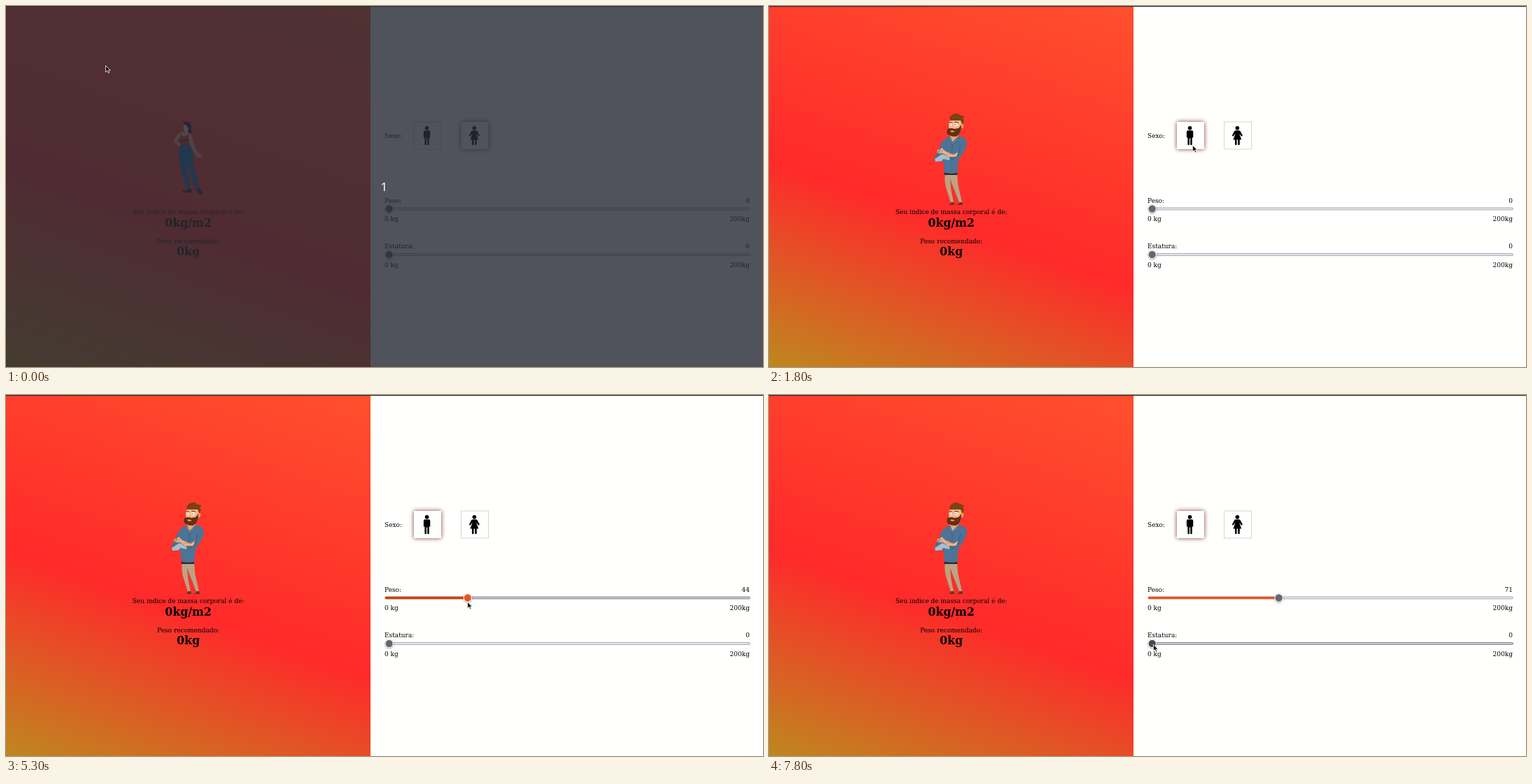
An HTML page for the animation above (8000 ms loop, 1082 by 517 pixels).

```html
<!DOCTYPE html>
<html lang="pt">
<head>
<meta charset="utf-8">
<title>Índice de massa corporal</title>
<style>
html, body { margin: 0; width: 100%; height: 100%; overflow: hidden; background: #fffffe; }
svg { position: absolute; left: 0; top: 0; width: 1082px; height: 517px; }
.panel { position: absolute; left: 0; top: 0; width: 521px; height: 517px;
  background: linear-gradient(199.5deg, #ff502d 0%, #ff2a2a 58%, #be871f 100%); }
text { font: 9px "DejaVu Serif", "Noto Serif", serif; fill: #000; }
.big { font-size: 15.75px; font-weight: bold; }
.mid { text-anchor: middle; }
.end { text-anchor: end; }
.count { font: 17px "Noto Sans", sans-serif; fill: #fff; }
</style>
</head>
<body>
<div class="panel"></div>
<svg viewBox="0 0 1082 517">
  <defs>
    <filter id="glow" x="-50%" y="-50%" width="200%" height="200%"><feGaussianBlur stdDeviation="3"/></filter>
    <filter id="soft" x="-50%" y="-50%" width="200%" height="200%"><feGaussianBlur stdDeviation=".8"/></filter>
  </defs>
  <rect width="1082" height="1.2" fill="#2d2e32"/>

  <g id="woman">
    <path d="M250 181Q244 184 240 193Q240 196 248 201L250 198L244 193L251 187Z" fill="#eeb08d"/>
    <path d="M261 181Q265 183 267 192L272 207L280 215L280 218L277 217L274 218L268 209L261 192Z" fill="#eeb08d"/>
    <path d="M249 182L257 178L264 183L262 191H249Z" fill="#f1b795"/>
    <path d="M253 168Q256 164 262 167Q267 172 264 177Q268 180 263 183Q258 180 258 174Z" fill="#17123b"/>
    <path d="M254 169L259 169L261 175L259 182L256 181V178L254 177Z" fill="#ffd9c2"/>
    <path d="M253 169Q256 165 261 168L260 175L258 171Z" fill="#17123b"/>
    <path d="M253 166Q254 164 256 165M264 174l2 1" fill="none" stroke="#7b1522"/>
    <path d="M250 182L251 186Q255 188 259 185L261 182L262 192L260 200H250L248 191Z" fill="#d83018"/>
    <path d="M249 192L260 191.5V193L250 194Z" fill="#391622"/>
    <path d="M250 199H261Q266 204 267 213L269 233L277 262L272 264L263 241L258 218L260 239L264 262H259Q249 235 247 216Q247 206 250 199Z" fill="#0871bd"/>
    <path d="M250 204Q257 211 263 204M257 211L260 220L262 235M250 222L257 246" fill="none" stroke="#075392" stroke-width=".8"/>
    <path d="M259 261L265 262L266 267H253Q251 265 254 264L258 265ZM272 263L277 261L280 266V270L276 269Z" fill="#1c1931"/>
  </g>

  <g id="man">
    <path d="M252 240H269L270 255L276 282H272L262 256L259 248L260 262L264 282H260L253 260Q250 248 252 240Z" fill="#bfa283"/>
    <path d="M259 249L262 257L272 282" fill="none" stroke="#8e7358" stroke-width=".8"/>
    <path d="M260 281H264L265 285H257Q258 283 260 283ZM272 281H276L277 285H269Q270 283 272 283Z" fill="#653424"/>
    <path d="M256 188L264 185L275 187Q282 189 283 196Q281 209 271 219L269 241H251L249 222L239 223Q235 222 237 217L246 197Q249 190 256 188Z" fill="#4d7397"/>
    <path d="M250 238.5Q260 241 269 239V242H251Z" fill="#33272b"/>
    <path d="M258 185L269 181L271 187L261 196Z" fill="#e9a474"/>
    <path d="M259 187L262 196L270 187L271 191L262 199L256 190ZM262 198L261 220" fill="#5c82a5" stroke="#34587c" stroke-width=".7"/>
    <path d="M257 166L266 160L277 162L276 172L272 182L257 180Z" fill="#f7b889"/>
    <path d="M275 169Q280 168 277 175L274 175Z" fill="#eda477"/>
    <path d="M258 162Q259 155 267 154Q270 153 272 156L279 158L277 162L279 164L276 170L274 164L260 164Z" fill="#7d4210"/>
    <path d="M255 176Q261 174 265 176L271 175L275 170Q275 184 267 187Q256 187 254 181Z" fill="#662e12"/>
    <path d="M259 179Q262 177 266 180L261 181Z" fill="#e99a79"/>
    <circle cx="259.5" cy="170" r="2" fill="#fff"/><circle cx="267.5" cy="170" r="2.2" fill="#fff"/>
    <path d="M257 167L262 167M265 166L271 167" stroke="#623012" stroke-width="1.2"/>
    <circle cx="259" cy="170" r=".7" fill="#222"/><circle cx="267" cy="170" r=".7" fill="#222"/>
    <path d="M240 207L247 203L252 208L264 213L270 209L268 216L256 216L249 211L241 211Z" fill="#f3b184"/>
    <path d="M237 219L248 212L258 217L258 221L249 219L247 222L238 223Z" fill="#a9bdcc"/>
    <path d="M240 208L249 206M239 210L249 209M253 212L266 212" stroke="#c67f58" stroke-width=".7"/>
    <path d="M274 199L271 213L261 221M246 202L239 216" fill="none" stroke="#365a7c" stroke-width=".8"/>
  </g>

  <text class="mid" x="260.5" y="298.3">Seu indice de massa corporal é de:</text>
  <text class="mid big" x="260.5" y="316">0kg/m2</text>
  <text class="mid" x="260.5" y="339.5">Peso recomendado:</text>
  <text class="mid big" x="260.5" y="357">0kg</text>

  <text x="541" y="189">Sexo:</text>
  <g id="buttons"></g>
  <g>
    <circle cx="601.6" cy="174.7" r="2.8"/>
    <path d="M598.6 178.3H604.6Q606.3 178.3 606.3 180V188.5H604.8V198.4Q603.5 200 602.2 198.4V189.5H601V198.4Q599.7 200 598.4 198.4V188.5H596.9V180Q596.9 178.3 598.6 178.3Z"/>
    <circle cx="669.4" cy="174.7" r="2.8"/>
    <path d="M667 178.3H671.8Q673 178.3 673.8 179.5L677 185.4L675.4 186.8L672.2 182.8L675.3 191.5H672.8V198.4Q671.5 200 670.2 198.4V191.5H668.6V198.4Q667.3 200 666 198.4V191.5H663.5L666.6 182.8L663.4 186.8L661.8 185.4L665 179.5Q665.8 178.3 667 178.3Z"/>
  </g>

  <g id="sliders"></g>
  <rect id="dim" y="1" width="1082" height="516" fill="#282c36" opacity=".81"/>
  <text id="count" class="count" x="535.6" y="265">1</text>
  <path id="cursor" d="M.4 .4V9.6L2.6 7.6L4.2 11L5.8 10.2L4.3 7H7.2Z" fill="#111" stroke="#fff" stroke-width=".8"/>
</svg>
<script>
const LOOP = 8000, STEP = 100;
const MIN_X = 547.7, UNIT = 2.549;   // thumb position at 0 and pixels per kg
const PRESS = 3400, RELEASE = 7100;

// time, x, y of the pointer tip
const POINTER = [
  [200, 142, 85], [500, 265, 138], [700, 415, 212], [900, 572, 256], [1000, 612, 248],
  [1100, 622, 226], [1600, 605, 199], [2400, 605, 199], [2900, 562, 268], [3200, 550, 292],
  [3300, 550, 292], [3400, 550.5, 292], [3500, 550.5, 292], [4000, 560.8, 292],
  [4400, 593.5, 292], [4800, 627, 294], [5300, 659.3, 296], [6200, 698, 297],
  [6400, 705.3, 297.5], [6900, 728.5, 298], [7000, 728.5, 298], [7400, 625, 324], [7800, 549, 357]
];

const $ = id => document.getElementById(id);
const show = (el, on) => el.setAttribute("visibility", on ? "visible" : "hidden");
const set = (el, attrs) => { for (const k in attrs) el.setAttribute(k, attrs[k]); };

function pointerAt(t) {
  const i = POINTER.findIndex(p => p[0] > t);
  if (i === 0) return POINTER[0].slice(1);
  if (i < 0) return POINTER[POINTER.length - 1].slice(1);
  const a = POINTER[i - 1], b = POINTER[i], k = (t - a[0]) / (b[0] - a[0]);
  return [1, 2].map(j => a[j] + (b[j] - a[j]) * k);
}

function makeButton(x) {
  const g = document.createElementNS("http://www.w3.org/2000/svg", "g");
  g.innerHTML = `<rect x="${x}" y="166" width="39" height="39" fill="#650b18" opacity=".8" filter="url(#glow)"/>
    <rect x="${x}" y="166" width="39" height="39" fill="#fffffe" stroke="#d3d3d3"/>`;
  $("buttons").append(g);
  const [glow, face] = g.children;
  return on => { show(glow, on); set(face, { "stroke-width": on ? 0 : 1 }); };
}

function makeSlider(label, y) {
  const g = document.createElementNS("http://www.w3.org/2000/svg", "g");
  g.innerHTML = `<text x="541" y="${y - 9}">${label}</text>
    <text class="end" x="1063" y="${y - 9}"></text>
    <text x="541" y="${y + 17.5}">0 kg</text><text class="end" x="1063" y="${y + 17.5}">200kg</text>
    <rect x="542" y="${y - 1.4}" width="521.5" height="2.8" rx="1.4" stroke-width=".9"/>
    <rect x="541.6" y="${y - 1.8}" height="3.6" rx="1.8"/>
    <circle cy="${y + .6}" r="6.3" fill="#000" opacity=".4" filter="url(#soft)"/>
    <circle cy="${y}" r="5.7" stroke="#fff" stroke-width="1.1"/>`;
  $("sliders").append(g);
  const [, value, , , track, fill, shade, thumb] = g.children;
  return (kg, hover, drag) => {
    const x = MIN_X + kg * UNIT;
    value.textContent = kg;
    set(track, { stroke: hover ? "#777784" : "#9999a5", fill: hover ? "#d0d0d7" : "#efeff2" });
    set(fill, { width: kg ? x - 541.6 : 0, fill: hover ? "#c8430f" : "#e25821" });
    set(shade, { cx: x });
    set(thumb, { cx: x, fill: drag ? "#e25821" : hover ? "#48484f" : "#66666f" });
  };
}

const maleButton = makeButton(583), femaleButton = makeButton(650.7);
const weight = makeSlider("Peso:", 290.5), height = makeSlider("Estatura:", 356);

function draw(t) {
  const [x, y] = pointerAt(t);
  const male = t >= 1500, swapped = t >= 1800;
  const dragX = pointerAt(Math.min(t, 6900))[0];
  const kg = t < PRESS ? 0 : Math.round((dragX - MIN_X) / UNIT);

  show($("dim"), t < 100);
  show($("count"), t < 100);
  show($("woman"), !swapped);
  show($("man"), swapped);
  maleButton(male);
  femaleButton(!male);
  weight(kg, t >= 3100 && t < RELEASE + 100, t >= PRESS && t < RELEASE);
  height(0, t >= 7700, false);
  set($("cursor"), { transform: `translate(${x} ${y})` });
}

const start = performance.now();
function tick() {
  const t = (performance.now() - start) % LOOP;
  draw(Math.floor(t / STEP) * STEP);
  requestAnimationFrame(tick);
}
tick();
</script>
</body>
</html>
```
